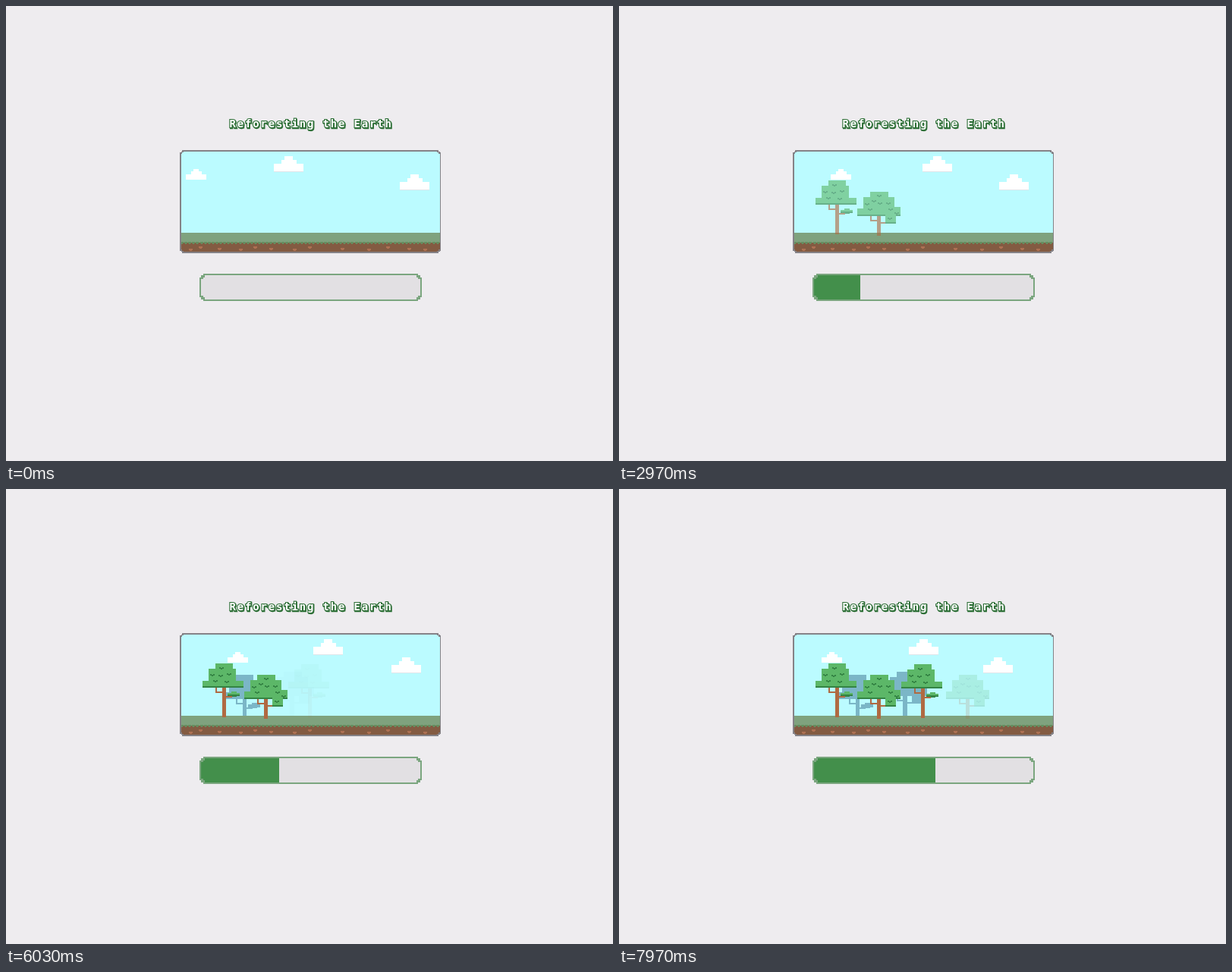
Write an HTML page that moves like this. It is 800x600 px and loops after 8 s.

```html
<!DOCTYPE html>
<html lang="en">
<head>
<meta charset="utf-8">
<title>Reforesting the Earth</title>
<style>
  html, body { margin: 0; width: 100%; height: 100%; overflow: hidden; background: #eeecef; }
  svg { display: block; width: 800px; height: 600px; shape-rendering: crispEdges; }
  .title { font: bold 14px "DejaVu Sans Mono", monospace; letter-spacing: 1.82px; }
  .green { --leaf: #5cb768; --shade: #348444; --wood: #b06a42; }
  .blue { --leaf: #7bb6c7; --shade: #7bb6c7; --wood: #7bb6c7; }
  .leaf { fill: var(--leaf); }
  .shade { fill: var(--shade); }
  .wood { fill: var(--wood); }
</style>
</head>
<body>
<svg viewBox="0 0 800 600">
  <defs>
    <g id="cloud">
      <path fill="#fff" d="M0 20V10H10V5H14V0H25V5H30V10H39V20Z"/>
      <path fill="#dfe6ea" d="M0 20H39V21H0Z"/>
    </g>
    <path id="heart" class="shade" d="M-3 -1H-1V0H1V-1H3V1H1V2H-1V1H-3Z"/>
    <g id="tall">
      <path class="wood" d="M284.5 261H290V273H298V275H290V301H284.5V269H276V261H278V267H284.5Z"/>
      <path class="leaf" d="M276 230H299V237H303V253H313V261H259V253H267V237H276Z"/>
      <path class="shade" d="M259 260H313V262H259Z"/>
      <path class="leaf" d="M297 267H304V269H308V272H292V269H297Z"/>
      <path class="shade" d="M292 271H308V273H304V274H298V273H292Z"/>
    </g>
    <g id="wide">
      <path class="wood" d="M339.5 276H345V285H352V287H345V303H339.5V284H331V276H333V282H339.5Z"/>
      <path class="leaf" d="M331 245H355V252H363V265H371V276H365V286H351V276H314V267H322V252H331Z"/>
      <path class="shade" d="M314 275H351V277H314ZM365 275H371V277H365ZM351 285H365V287H351Z"/>
    </g>
    <clipPath id="sceneClip"><path id="sceneShape"/></clipPath>
    <clipPath id="barClip"><path id="barShape"/></clipPath>
  </defs>

  <g class="title">
    <text x="295.2" y="161.2" fill="#2f7038" stroke="#2f7038" stroke-width="2.4">Reforesting the Earth</text>
    <text x="294.5" y="160" fill="#fff" stroke="#2f7038" stroke-width="2.2" paint-order="stroke">Reforesting the Earth</text>
  </g>

  <g clip-path="url(#sceneClip)">
    <path fill="#bbfbff" d="M229 190H574V327H229Z"/>
    <g id="clouds"></g>
    <g id="farTrees"></g>
    <path fill="#7fa27e" d="M229 299H574V312H229Z"/>
    <path fill="#835b42" d="M229 312H574V327H229Z"/>
    <g id="soil"></g>
    <g id="nearTrees"></g>
  </g>
  <path id="sceneEdge" fill="none" stroke="#858287" stroke-width="1.6"/>

  <path id="barBack" fill="#e2e0e3"/>
  <g clip-path="url(#barClip)"><rect id="fill" x="257" y="354" height="34" fill="#438f4b"/></g>
  <path id="barEdge" fill="none" stroke="#7ba67f" stroke-width="2.4"/>
</svg>
<script>
const LOOP = 8000, MOVE = 650;
const $ = id => document.getElementById(id);

function add(parent, tag, attrs) {
  const el = document.createElementNS('http://www.w3.org/2000/svg', tag);
  for (const name in attrs) el.setAttribute(name, attrs[name]);
  return parent.appendChild(el);
}

// Rectangle whose corners are cut into two pixel steps of size s.
const stepped = (x, y, w, h, s) =>
  `M${x + 2 * s} ${y}h${w - 4 * s}v${s}h${s}v${s}h${s}v${h - 4 * s}` +
  `h${-s}v${s}h${-s}v${s}h${4 * s - w}v${-s}h${-s}v${-s}h${-s}v${4 * s - h}h${s}v${-s}h${s}z`;

const scenePath = stepped(229.8, 190.8, 342.6, 134.4, 1.6);
const barPath = stepped(256.2, 354.2, 290.6, 33.6, 2.3);
for (const id of ['sceneShape', 'sceneEdge']) $(id).setAttribute('d', scenePath);
for (const id of ['barShape', 'barBack', 'barEdge']) $(id).setAttribute('d', barPath);

// Grass fringe and pebbles
for (let x = 230; x < 573; x += 5.1)
  add($('soil'), 'path', { d: `M${x} 311h4v2h-1v1h-2v-1h-1z`, fill: '#658e60' });
[244, 257, 282, 310, 329, 350, 381, 401, 444, 479, 504, 532, 553].forEach((x, i) =>
  add($('soil'), 'path', {
    d: `M${x - 3} ${[320, 317, 319][i % 3]}h5v2h-1v1h-3v-1h-1z`, fill: '#ad7052'
  }));

const hearts = {
  tall: [[284, 236], [272, 245], [283, 246], [294, 244], [276, 253], [291, 254]],
  wide: [[343, 250], [336, 257], [327, 261], [344, 260], [355, 260], [331, 268], [358, 268], [366, 273], [357, 280]]
};
for (const kind in hearts)
  for (const [x, y] of hearts[kind]) add($(kind), 'use', { href: '#heart', x, y });

// Each stage: start time, bar end and left edges of the three clouds
const stages = [
  { at: -MOVE, bar: 257, clouds: [237, 353, 519] },
  { at: 930, bar: 293, clouds: [256.5, 391.5, 488] },
  { at: 2600, bar: 333, clouds: [293, 405.5, 509] },
  { at: 4270, bar: 358.5, clouds: [293, 405.5, 509] },
  { at: 5940, bar: 408, clouds: [267, 381.5, 480] },
  { at: 7780, bar: 458, clouds: [267, 381.5, 480] }
];

const plant = (layer, color, kind, x, y, stage) =>
  ({ stage, el: add($(layer), 'use', { href: '#' + kind, class: color, x, y }) });
const trees = [
  plant('farTrees', 'blue', 'tall', 27, 15, 3),
  plant('farTrees', 'blue', 'wide', 34.5, -4, 4),
  plant('nearTrees', 'green', 'tall', 0, 0, 2),
  plant('nearTrees', 'green', 'wide', 0, 0, 2),
  plant('nearTrees', 'green', 'tall', 113, 1.3, 4),
  plant('nearTrees', 'green', 'wide', 117, 0, 5)
];
const clouds = [[215, 0.69], [198, 1], [222, 1]].map(([y, size]) =>
  ({ y, size, el: add($('clouds'), 'use', { href: '#cloud' }) }));

// cubic-bezier(.42, 0, .58, 1)
function ease(x) {
  if (x <= 0) return 0;
  if (x >= 1) return 1;
  let lo = 0, hi = 1, u = 0.5;
  for (let i = 0; i < 20; i++) {
    u = (lo + hi) / 2;
    const bx = 1.26 * u * (1 - u) ** 2 + 1.74 * u * u * (1 - u) + u ** 3;
    if (bx < x) lo = u; else hi = u;
  }
  return u * u * (3 - 2 * u);
}

function draw(t) {
  const progress = stages.map(s => ease((t - s.at) / MOVE));
  const blend = pick => stages.slice(1).reduce(
    (v, s, i) => v + (pick(s) - pick(stages[i])) * progress[i + 1], pick(stages[0]));
  $('fill').setAttribute('width', blend(s => s.bar) - 257);
  clouds.forEach((c, i) =>
    c.el.setAttribute('transform', `translate(${blend(s => s.clouds[i])} ${c.y}) scale(${c.size})`));
  for (const { el, stage } of trees) el.setAttribute('opacity', progress[stage]);
}

let start;
function frame(now) {
  start ??= now;
  draw((now - start) % LOOP);
  requestAnimationFrame(frame);
}
draw(0);
requestAnimationFrame(frame);
</script>
</body>
</html>
```
